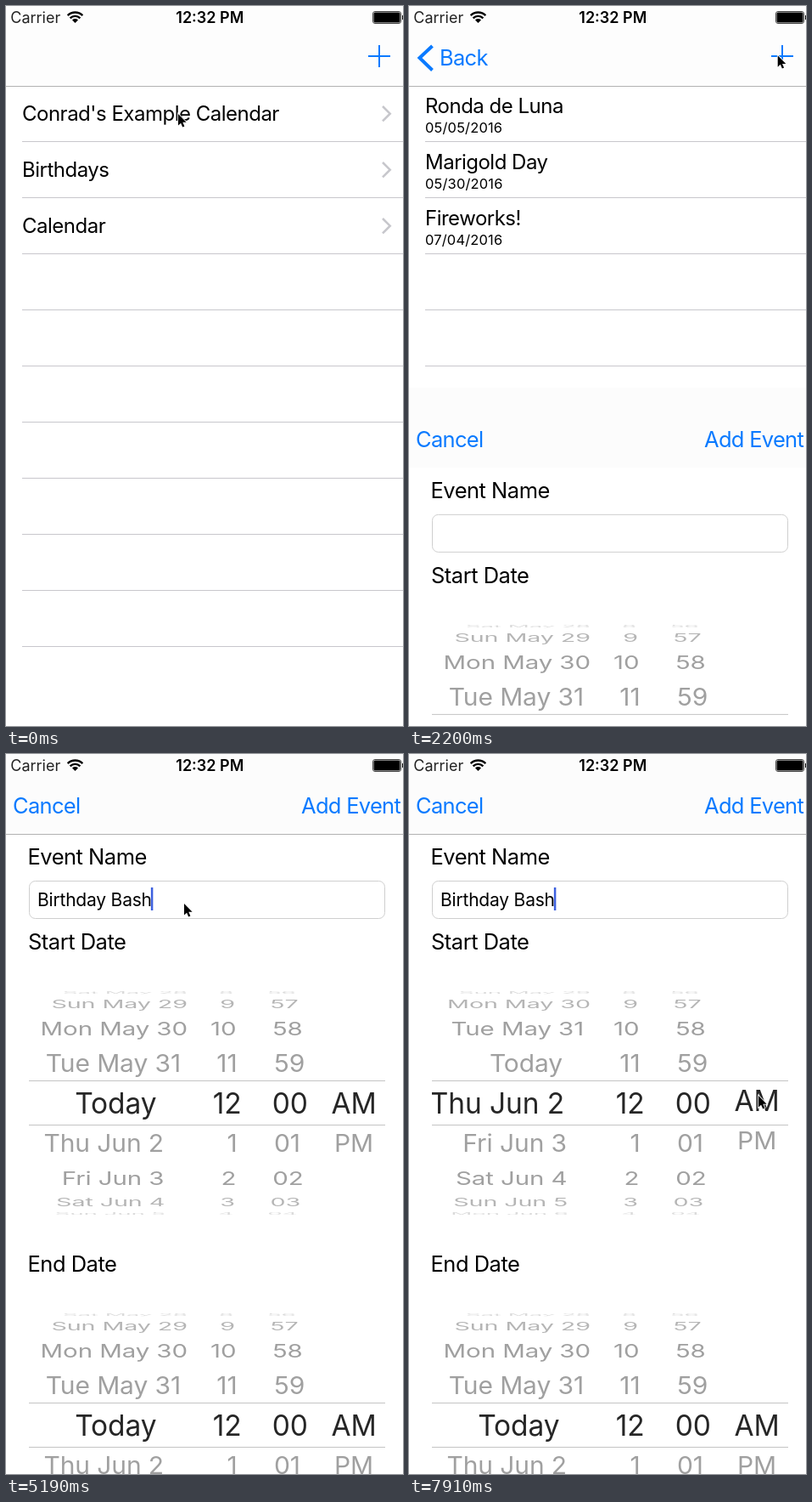
Recreate the animation shown at these times as an HTML page. Size 468 px wide and 847 px high, loop 8 s.

```html
<!DOCTYPE html>
<html lang="en">
<head>
<meta charset="utf-8">
<title>Calendar app</title>
<style>
html, body { margin: 0; width: 100%; height: 100%; overflow: hidden; background: #fff; }
svg { display: block; width: 468px; height: 847px; font-family: Inter, Roboto, sans-serif; }
text { white-space: pre; }
.status { font-size: 18px; }
.row { font-size: 24px; letter-spacing: -.5px; }
.date { font-size: 16.5px; letter-spacing: .15px; }
.label { font-size: 25.5px; letter-spacing: -.5px; }
.field { font-size: 21px; letter-spacing: -.2px; }
.wheel { font-size: 30px; letter-spacing: -.1px; }
.blue { fill: #0a7aff; letter-spacing: -.7px; }
</style>
</head>
<body>
<svg viewBox="0 0 468 847">
  <defs>
    <clipPath id="band"><rect x="27" y="-26" width="420" height="51"/></clipPath>
    <clipPath id="drum">
      <rect x="27" y="-134" width="420" height="107"/>
      <rect x="27" y="26" width="420" height="108"/>
    </clipPath>
    <linearGradient id="edge">
      <stop offset="0" stop-opacity="0"/>
      <stop offset="1" stop-opacity=".14"/>
    </linearGradient>
  </defs>
  <g id="stage"></g>
  <g id="status">
    <text class="status" x="5.3" y="20" fill="#222">Carrier</text>
    <g fill="none" stroke="#000" stroke-width="2.4">
      <path d="M72.7 11.2a12.4 12.4 0 0 1 17.6 0M75.6 14.4a8.2 8.2 0 0 1 11.8 0"/>
      <path d="M81.5 20l-3.5-3.5a5 5 0 0 1 7 0z" fill="#000" stroke="none"/>
    </g>
    <text class="status" x="240.3" y="20" text-anchor="middle" font-weight="600">12:32 PM</text>
    <rect x="432.5" y="6.5" width="33" height="14" rx="2.5" fill="#fff" stroke="#444"/>
    <rect x="433.5" y="7.5" width="31" height="12" rx="1.5"/>
    <rect x="467" y="11" width="1" height="5"/>
  </g>
  <path id="pointer" d="M0 0V13.6L3.1 10.7L5.2 15.4L7.4 14.4L5.3 9.8H9.6Z"
    stroke="#fff" stroke-width="1.6" paint-order="stroke"/>
</svg>
<script>
const LOOP = 8000, START = 630, TICK = 87.7, SLACK = 22;
const PUSH = 730, SHEET = 2128.9;
const ROW = 66, STEP = 21 * Math.PI / 180, RADIUS = 131, VANISH = 212;

const stage = document.getElementById('stage');
const pointer = document.getElementById('pointer');

const calendars = ["Conrad's Example Calendar", 'Birthdays', 'Calendar'];
const events = [
  ['Ronda de Luna', '05/05/2016'],
  ['Marigold Day', '05/30/2016'],
  ['Fireworks!', '07/04/2016']
];

// [time, text typed so far]
const typing = [
  [3610, 'B'], [3950, 'Bi'], [4040, 'Bir'], [4125, 'Birt'], [4210, 'Birth'], [4390, 'Birthda'],
  [4570, 'Birthday'], [4660, 'Birthday '], [4840, 'Birthday B'], [5020, 'Birthday Ba'], [5190, 'Birthday Bash']
];

// [time, x, y]
const pointerPath = [
  [0, 203, 127], [630, 203, 127], [805, 201, 128], [980, 240, 115], [1410, 433, 59], [1500, 435, 58],
  [2208, 435, 58], [2559, 257, 141], [2810, 210, 176], [5750, 210, 176], [6350, 153, 428],
  [6520, 153, 426], [6857, 162, 389], [6980, 164, 376], [7300, 412, 416], [7680, 412, 416], [7909, 412, 402]
];
const dayScroll = [[6520, 0], [6857, .5], [6980, .78], [7080, .93], [7220, 1]];
const halfScroll = [[7790, 0], [7909, .07]];

const mod = (a, n) => (a % n + n) % n;

function along(keys, t, field = 1) {
  if (t <= keys[0][0]) return keys[0][field];
  for (let i = 1; i < keys.length; i++) {
    const a = keys[i - 1], b = keys[i];
    if (t < b[0]) return a[field] + (b[field] - a[field]) * (t - a[0]) / (b[0] - a[0]);
  }
  return keys[keys.length - 1][field];
}

// critically damped spring from 0 to 1
function spring(ms) {
  const u = Math.max(0, ms) * .02;
  return 1 - (1 + u) * Math.exp(-u);
}

const rect = (x, y, w, h, fill, more = '') =>
  `<rect x="${x}" y="${y}" width="${w}" height="${h}" fill="${fill}" ${more}/>`;
const text = (cls, x, y, s, more = '') => `<text class="${cls}" x="${x}" y="${y}" ${more}>${s}</text>`;
const move = (x, y, body) => `<g transform="translate(${x} ${y})">${body}</g>`;

function separators(count) {
  let out = '';
  for (let i = 1; i <= count; i++) out += rect(19, 93 + ROW * i, 460, 1, '#c8c7cc');
  return out;
}

function calendarList(t) {
  let out = t >= START ? rect(-3, 95, 480, 65, '#d9d9d9') : '';
  calendars.forEach((name, i) => {
    const y = 135 + ROW * i;
    out += text('row', 19, y, name) +
      `<path d="M444 ${y - 17}l8.7 8.7l-8.7 8.7" fill="none" stroke="#c7c7cc" stroke-width="2.6"/>`;
  });
  return out + separators(10);
}

function eventList() {
  let out = rect(-3, 95, 480, 760, '#fff');
  events.forEach(([name, day], i) => {
    out += text('row', 19, 126 + ROW * i, name) + text('date', 19, 148.5 + ROW * i, day);
  });
  return out + separators(11);
}

function navBar(p) {
  let out = rect(0, 0, 468, 94, '#fdfdfd');
  if (p > 0 && p < .98) out += rect(0, 45, 480 * (1 - p) + 9, 49, '#f4f4f4');
  out += rect(0, 94, 468, 1, '#b2b2b2') + rect(427, 58, 26, 2, '#0a7aff') + rect(439, 46, 2, 26, '#0a7aff');
  const arrow = '<path d="M27.5 47L12.5 61L27.5 75.5" fill="none" stroke="#0a7aff" stroke-width="4"/>';
  return out + `<g opacity="${p ** 4}">${arrow}${text('label blue', 36 + 165 * (1 - p), 70, 'Back')}</g>`;
}

function dayItem(i) {
  if (i === 0) return ['Today', 181];
  const week = ['Wed', 'Thu', 'Fri', 'Sat', 'Sun', 'Mon', 'Tue'][mod(i, 7)];
  return i < 0 ? [`${week} May ${32 + i}`, i === -1 ? 206 : 214] : [`${week} Jun ${1 + i}`, 186];
}

// item gives [label, x]; zoom is the x that the magnified row grows from
const columns = [
  { item: dayItem, anchor: 'end', zoom: 212 },
  { item: i => [mod(11 + i, 12) + 1, 272.5], anchor: 'end', zoom: 230 },
  { item: i => [String(mod(i, 60)).padStart(2, '0'), 316], anchor: 'start', zoom: 335 },
  { item: i => i === 0 || i === 1 ? [i ? 'PM' : 'AM', 410] : null, anchor: 'middle', zoom: 410 }
];

function picker(cy, scrolls, topLine, bottomLine) {
  let drum = '', band = '';
  columns.forEach((col, c) => {
    const scroll = scrolls[c], mid = Math.round(scroll);
    for (let i = mid - 4; i <= mid + 4; i++) {
      const angle = (i - scroll) * STEP, cos = Math.cos(angle), item = col.item(i);
      if (!item || cos < .04) continue;
      const y = RADIUS * Math.sin(angle), s = 1 - .09 * (.934 - cos);
      const row = (x0, scale, fill, alpha) =>
        `<g transform="translate(${x0} ${y}) scale(${scale})" fill="${fill}" opacity="${alpha}">` +
        text('wheel', item[1] - x0, 10.9, item[0], `text-anchor="${col.anchor}"`) + '</g>';
      drum += row(VANISH, `${s} ${s * cos}`, '#a0a0a0', Math.min(1, .25 + 1.15 * cos));
      if (Math.abs(i - scroll) < 1.2) band += row(col.zoom, 1.117, '#262626', 1);
    }
  });
  return move(0, cy,
    `<g clip-path="url(#drum)">${drum}</g><g clip-path="url(#band)">${band}</g>` +
    (topLine ? rect(27, -27, 420, 1, '#c4c4c4') : '') +
    (bottomLine ? rect(27, 25, 420, 1, '#c4c4c4') : ''));
}

function caretOn(t) {
  if (t < 3070) return false;
  return t < 5815 || (t - 5815) % 1100 > 480;
}

function sheet(t, settled) {
  let typed = '';
  for (const [at, s] of typing) if (t >= at - 10) typed = s;
  const scrolls = [along(dayScroll, t), 0, 0, along(halfScroll, t)];
  return rect(0, 0, 468, 860, '#fff') + rect(0, 0, 468, 94, '#fcfcfc') +
    (settled ? rect(0, 94, 468, 1, '#b2b2b2') : '') +
    text('label blue', 8, 70, 'Cancel') + text('label blue', 348, 70, 'Add Event') +
    text('label', 25.5, 130, 'Event Name') +
    rect(27.5, 149.5, 419, 44, '#fff', 'rx="7" stroke="#cfcfcf"') +
    text('field', 37, 178.5, typed, 'id="typed"') +
    (caretOn(t) ? rect(38, 157, 2.5, 27, '#3d60de', 'id="caret"') : '') +
    text('label', 26, 230, 'Start Date') + picker(411, scrolls, true, settled) +
    text('label', 25.5, 609, 'End Date') + picker(790, [0, 0, 0, 0], settled, true);
}

function draw(t) {
  const p = t < PUSH ? 0 : spring(t - PUSH);
  const rise = 852 * (1 - spring(t - SHEET));
  const settled = rise < .9;
  let out = '';
  if (!settled) {
    if (p < .999) {
      out += move(-144 * p, 0, calendarList(t)) + rect(0, 95, 468, 760, '#000', `opacity="${.1 * p}"`);
    }
    if (p > 0) {
      const left = p < .999 ? 480 * (1 - p) : 0;
      out += move(left, 0, rect(-14, 95, 11, 760, 'url(#edge)') + eventList());
    }
    out += navBar(p);
  }
  if (t >= SHEET) out += move(0, settled ? 0 : rise, sheet(t, settled));
  stage.innerHTML = out;

  const caret = document.getElementById('caret');
  if (caret) {
    const typed = document.getElementById('typed');
    const end = typed.textContent ? typed.getComputedTextLength() : 0;
    caret.setAttribute('x', 37.5 + Math.max(.5, end - 1.5));
  }
  pointer.setAttribute('transform', `translate(${along(pointerPath, t, 1)} ${along(pointerPath, t, 2)})`);
}

// the screen is refreshed in even steps after an opening pause
function held(t) {
  const n = Math.floor((t - START + SLACK) / TICK);
  return t < START ? 0 : START + n * TICK;
}

let last = -1;
const begin = performance.now();
function frame() {
  const t = held((performance.now() - begin) % LOOP);
  if (t !== last) draw(last = t);
  requestAnimationFrame(frame);
}
frame();
</script>
</body>
</html>
```
